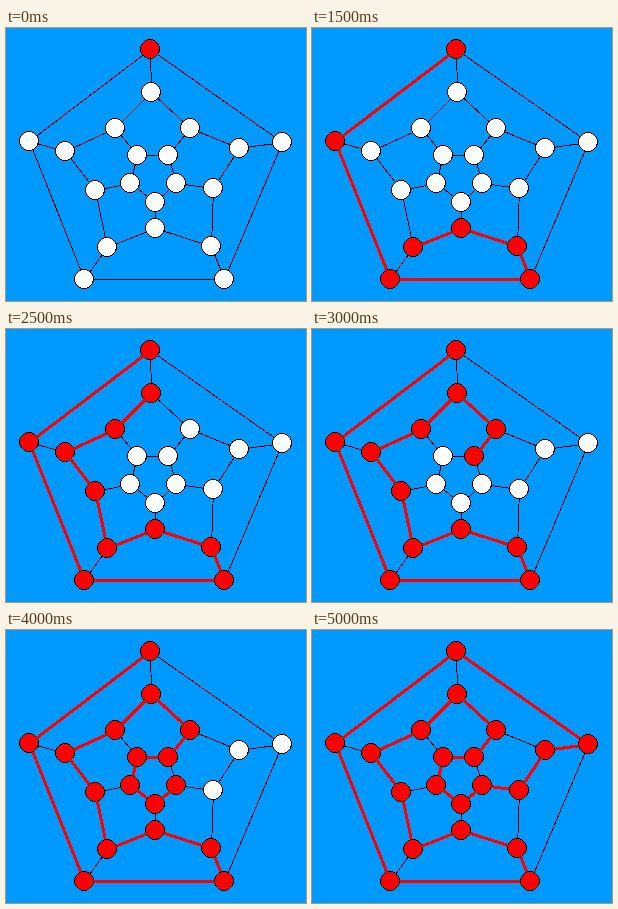
An HTML page for the animation above (5.25 s loop, 300 px wide and 273 px high).

```html
<!DOCTYPE html>
<html lang="en">
<head>
<meta charset="utf-8">
<title>Hamiltonian cycle on a dodecahedron</title>
<style>
  html, body { margin: 0; width: 100%; height: 100%; overflow: hidden; background: #09f; }
  svg { display: block; width: 300px; height: 273px; shape-rendering: crispEdges; }
  line { stroke: #000; stroke-width: 1; }
  line.on { stroke: #f00; stroke-width: 3; }
  circle { fill: #fff; stroke: #000; stroke-width: 1; }
  circle.on { fill: #f00; }
</style>
</head>
<body>
<svg viewBox="0 0 300 273">
  <rect width="300" height="273" fill="#09f"/>
  <g id="edges"></g>
  <g id="nodes"></g>
</svg>
<script>
const STEP = 250;

// Vertices in the order the cycle visits them.
const points = [
  [144, 21], [23, 113], [78, 251], [218, 251], [205, 218],
  [149, 200], [101, 219], [89, 162], [59, 123], [109, 100],
  [145, 64], [184, 100], [162, 127], [131, 127], [124, 155],
  [149, 174], [170, 155], [207, 160], [233, 120], [276, 114]
];
const count = points.length;

// Edges that the cycle leaves out.
const chords = [
  [0, 10], [1, 8], [2, 6], [3, 19], [4, 17],
  [5, 15], [7, 14], [9, 13], [11, 18], [12, 16]
];

function add(parent, tag, attrs) {
  const el = document.createElementNS("http://www.w3.org/2000/svg", tag);
  for (const name in attrs) el.setAttribute(name, attrs[name]);
  return document.getElementById(parent).appendChild(el);
}

// Lines run through pixel centres.
function addEdge(a, b) {
  const [x1, y1] = points[a].map(v => v + 0.5);
  const [x2, y2] = points[b].map(v => v + 0.5);
  return add("edges", "line", { x1, y1, x2, y2 });
}

chords.forEach(([a, b]) => addEdge(a, b));
const cycle = points.map((_, i) => addEdge(i, (i + 1) % count));
const nodes = points.map(([cx, cy]) => add("nodes", "circle", { cx, cy, r: 9.5 }));

function draw(time) {
  const step = Math.floor(time / STEP) % (count + 1);
  cycle.forEach((edge, i) => edge.classList.toggle("on", i < step));
  nodes.forEach((node, i) => node.classList.toggle("on", i <= step));
}

function tick(now) {
  draw(now);
  requestAnimationFrame(tick);
}

draw(0);
requestAnimationFrame(tick);
</script>
</body>
</html>
```
